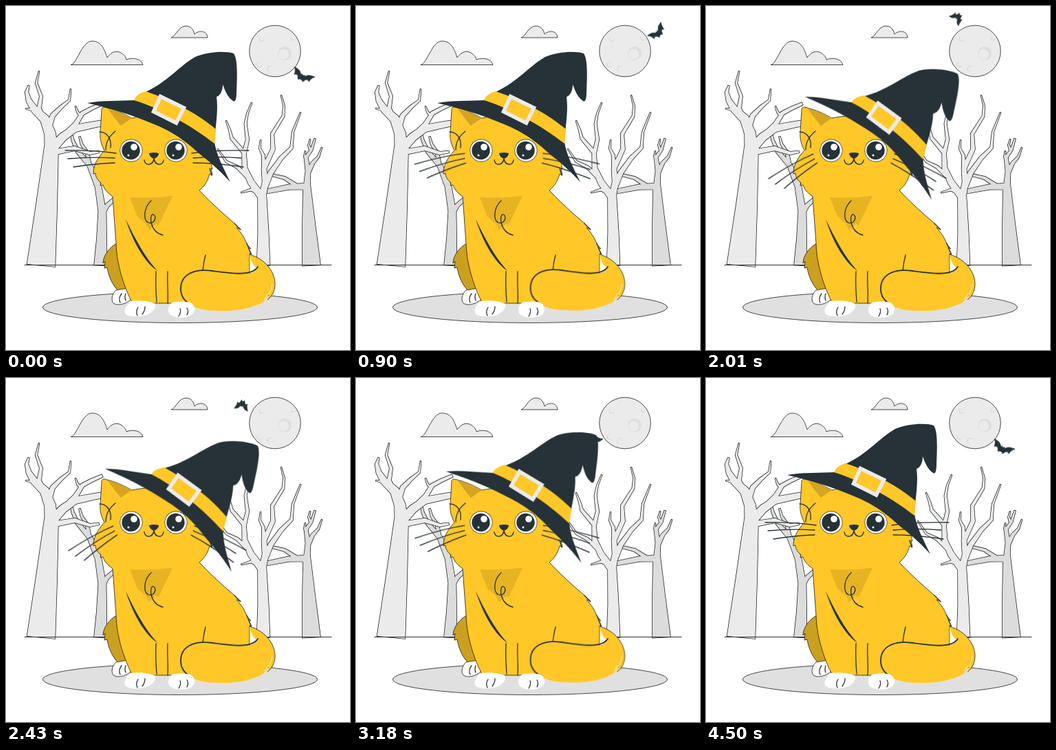
An HTML page for the animation above (4.56 s loop, 500 by 500 pixels).

```html
<!DOCTYPE html>
<html lang="en">
<head>
<meta charset="utf-8">
<title>Halloween cat</title>
<style>
html, body { margin: 0; width: 100%; height: 100%; overflow: hidden; background: #fff; }
svg { display: block; width: 100%; height: 100%; }
.edge { stroke: #1c1c1c; stroke-width: .8; }
.pale { fill: #ebebeb; }
.fur { fill: #ffc727; }
.ink { fill: #263238; }
.line { fill: none; stroke: #263238; stroke-width: 1.5; stroke-linecap: round; }
.anim { animation: 4560ms linear infinite; }
#orbit { transform-origin: 391px 65px; animation-name: orbit; }
#wings { animation-name: flap; }
#hat { transform-origin: 182px 280px; animation-name: tilt; }
#left { --turn: -32deg; transform-origin: 160px 222px; animation-name: droop; }
#right { --turn: 28deg; transform-origin: 270px 222px; animation-name: droop; }
#tail { transform-origin: 366px 380px; animation-name: sway; }
#wings, #hat, #left, #right, #tail { animation-timing-function: ease-in-out; }
@keyframes orbit {
  0% { transform: rotate(0deg); }
  98.68%, 100% { transform: rotate(-360deg); }
}
@keyframes flap {
  0%, 100% { transform: scaleX(1.02); }
  45% { transform: scaleX(.6); }
  94% { transform: scaleX(1.04); }
}
@keyframes tilt {
  0%, 20.8%, 81.6%, 100% { transform: rotate(0deg); }
  35.5%, 57.9% { transform: rotate(10.2deg); }
}
@keyframes droop {
  0%, 12.5%, 81.6%, 100% { transform: rotate(0deg); }
  27.4%, 59.2% { transform: rotate(var(--turn)); }
}
@keyframes sway {
  0%, 33%, 55%, 83%, 100% { transform: rotate(0deg); }
  20%, 69.7% { transform: rotate(.7deg); }
}
</style>
</head>
<body>
<svg viewBox="0 0 500 500">
  <g class="pale edge">
    <path d="M94 85.5C103 85 110 51 125 51C138 51 143 62 147 75C153 67 160 64 167 68C172 71 174 74 175 78C185 74 197 77 199 85.5Z"/>
    <path d="M240 46C247 44 250 30 261 29C270 29 273 36 274 41C280 35 292 35 293 46Z"/>
    <circle cx="391" cy="65.5" r="37.3"/>
  </g>
  <g fill="#dedede">
    <circle cx="405" cy="69" r="10"/><circle cx="371.500" cy="48" r="4"/>
    <circle cx="417" cy="47" r="3.500"/><circle cx="368" cy="85.500" r="4"/><circle cx="384" cy="91.500" r="5"/>
  </g>
  <g class="pale">
    <circle cx="403.500" cy="70" r="7.500"/><circle cx="372" cy="47" r="3"/>
    <circle cx="417.500" cy="46" r="2.500"/><circle cx="369" cy="85" r="3"/><circle cx="385" cy="92" r="4"/>
  </g>

  <g id="trees"></g>
  <path class="line" style="stroke-width:1" d="M27 376.500H473"/>
  <ellipse class="edge" cx="253" cy="438" rx="199.500" ry="22.500" fill="#e0e0e0"/>

  <g id="orbit" class="anim">
    <g transform="translate(432 100) rotate(27)">
      <path id="wings" class="ink anim" d="M-17 -5C-10 -5 -5 -3 -3 1L-2 -1L0 1L2 -1L3 1C5 -3 10 -5 17 -5C13 -1 12 2 12 6C9 3 6 4 5 8L3 10L2 8H-2L-3 10L-5 8C-6 4 -9 3 -12 6C-12 2 -13 -1 -17 -5Z"/>
    </g>
  </g>

  <!-- body -->
  <path class="edge" fill="#cca01f" d="M161 345C150 351 141 363 141 374L144 371L143 381L147 380C150 398 158 411 170 420L186 412Z"/>
  <path class="edge" fill="#fff" d="M160 413C153 419 152 431 158 433C165 436 178 432 184 424L178 410Z"/>
  <path class="fur edge" d="M139 151C139 147 142 146 147 148C160 151 173 157 183 163C192 161 201 160 208 160L290 180C299 205 297 226 300 237L298 236L300 246L296 244C293 256 287 263 281 268C292 280 304 291 316 302L331 315L341 325L335 322C342 330 347 337 350 346L356 353L352 351L357 361L354 360V388L350 432H184C174 414 161 380 160 345L155 277C148 272 143 267 141 260L137 261L138 257C133 253 130 248 130 243L127 244C127 231 133 221 143 210C139 202 136 194 137 184Z"/>
  <path fill="#d4a422" d="M148 149C162 152 173 157 183 163C177 167 172 170 167 174C159 164 153 157 148 149Z"/>
  <path fill="#e6b323" d="M180 278Q211 280 242 276L222 318L217 317L208 326L204 317L191 306Z"/>
  <g class="line" style="stroke-width:1.300">
    <path d="M136 183C146 183 154 192 152 206M159 182C150 189 145 199 145 209"/>
    <path d="M211 283C200 293 199 311 207 315C216 318 220 305 214 303C208 302 208 328 228 333"/>
    <path d="M218 386C217 402 218 417 219 430M235 386C234 401 236 417 235 432M286 385Q287 373 290 362"/>
    <path d="M332 316L341 325M350 345L356 360M296 236L299 246"/>
  </g>
  <path class="ink" d="M174 310C187 337 201 364 220 385C203 373 187 349 174 310Z"/>

  <g id="tail" class="anim">
    <path class="fur" d="M354 361C380 369 391 389 391 404C391 414 387 422 380 427L383 419L374 430C357 440 334 444 309 443C290 443 275 440 264 432C253 424 252 408 259 397C273 376 310 387 354 389Z"/>
    <path class="edge" fill="none" d="M354 361C380 369 391 389 391 404C391 414 387 422 380 427"/>
    <path fill="#fff" d="M355 364C357 374 361 380 366 380C362 385 359 387 355 388Z"/>
    <path class="line" style="stroke-width:1.800" d="M366 379C357 393 330 389 300 385C272 381 254 391 254 411C254 423 261 430 269 434"/>
    <path fill="none" stroke="#fff3c8" d="M387 404Q386 413 382 419M381 417L376 426"/>
  </g>

  <path fill="#fff" d="M182 429C174 434 170 443 174 448C181 453 198 452 207 448C215 444 219 437 216 432C206 429 194 427 182 429Z"/>
  <path fill="#fff" d="M241 431C234 437 234 447 241 450C250 455 267 453 272 447C277 440 272 433 268 431C260 429 250 429 241 431Z"/>
  <path class="line" style="stroke-width:1.300" d="M168 418C165 422 164 427 166 431M174 418Q172 423 174 428M192 438Q188 444 191 450M202 437Q202 443 198 448M253 440Q255 445 251 451M263 439Q266 444 263 449"/>

  <!-- face -->
  <g id="eyes"></g>
  <path class="ink" d="M208 214Q215 212 222 214C222 218 218 221 215 222C212 221 208 218 208 214Z"/>
  <path class="line" d="M201 224C202 232 213 233 215 222C217 233 228 232 229 224"/>
  <g class="line" style="stroke-width:1.300">
    <path id="left" class="anim" d="M160 214Q125 209 86 210M158 221Q124 219 90 222M158 228Q130 229 98 234"/>
    <path id="right" class="anim" d="M270 214Q305 209 353 210M272 221Q306 218 342 221M272 228Q302 228 345 234"/>
  </g>

  <g id="hat" class="anim">
    <path class="ink" d="M118 141C140 137 165 138 187 137L203 125C235 110 251 88 275 74C294 66 320 65 331 69C337 77 336 102 335 126C335 136 333 140 330 138C322 133 318 122 315 114C315 122 312 130 306 132C309 152 304 177 303 197C305 215 316 235 326 256C315 244 300 229 285 218C270 205 255 190 225 176C198 164 163 151 118 141Z"/>
    <path class="fur" d="M186 137C189 130 195 126 203 124C245 138 280 158 305 179L303 200C270 174 223 148 186 137Z"/>
    <path class="fur" stroke="#ebebeb" stroke-width="5.500" d="M224.500 131.500L258.500 148L247.500 170L214.500 153.500Z"/>
  </g>
</svg>
<script>
const SVG = "http://www.w3.org/2000/svg";
const add = (parent, tag, attrs) => {
  const el = document.createElementNS(SVG, tag);
  for (const k in attrs) el.setAttribute(k, attrs[k]);
  return parent.appendChild(el);
};

// Tapered limb along a polyline, from width a to width b
function limb(a, b, line) {
  const pts = line.split(" ").map(p => p.split(",").map(Number));
  const n = pts.length - 1, near = [], far = [];
  pts.forEach(([x, y], i) => {
    const p = pts[Math.max(i - 1, 0)], q = pts[Math.min(i + 1, n)];
    const dx = q[0] - p[0], dy = q[1] - p[1];
    const h = (a + (b - a) * i / n) / 2 / Math.hypot(dx, dy);
    near.push([x - dy * h, y + dx * h]);
    far.unshift([x + dy * h, y - dx * h]);
  });
  return "M" + [...near, ...far].map(p => p.map(v => v.toFixed(1)).join(" ")).join("L") + "Z";
}

function tree(fill, ...limbs) {
  const d = limbs.map(l => limb(...l)).join("");
  const g = document.getElementById("trees");
  add(g, "path", { d, fill: "none", stroke: "#1c1c1c", "stroke-width": 1.5 });
  add(g, "path", { d, fill });
}

tree("#dcdcdc",
  [18, 11, "137,377 139,340 140,295"],
  [11, 2, "140,300 134,262 122,232 104,211 97,195 94,181"],
  [6, 2, "121,232 118,213 110,201 107,190"],
  [7, 5, "140,302 147,290 158,280"]);
tree("#ebebeb",
  [41, 20, "51,377 59,290 66,205"],
  [19, 2, "66,212 64,185 56,164 41,150 33,137 30,125 33,116"],
  [8, 1, "54,163 48,149 51,131 44,112 48,95"],
  [9, 1, "62,176 68,159 80,147 92,137 94,121"],
  [5, 1, "46,155 38,151 29,149"],
  [14, 7, "68,206 83,190 100,178 130,172 165,166"],
  [8, 4, "88,185 101,172 111,156 124,149 140,142"],
  [4, 1, "109,160 104,154 101,146"],
  [8, 3, "72,212 100,207 122,214 135,212"]);
tree("#dcdcdc",
  [26, 10, "444,377 440,315 437,258"],
  [9, 2, "437,264 439,240 436,220 444,209 449,193"],
  [7, 1, "439,242 446,228 454,219 459,206"],
  [4, 1, "437,228 434,219 435,211"],
  [4, 1, "443,211 440,202 442,194"],
  [9, 6, "437,262 412,263 376,270"],
  [6, 3, "425,263 405,250 384,245"]);
tree("#ebebeb",
  [19, 12, "374,377 374,330 372,270"],
  [11, 1, "372,278 356,256 347,236 346,213 328,192 325,180 320,167"],
  [6, 1, "346,215 351,194 348,171 351,156 357,141"],
  [6, 1, "352,249 336,234 320,226 308,208"],
  [6, 1, "370,272 356,267 342,271"],
  [10, 1, "373,276 377,256 375,236 388,208 387,186 403,160 404,145 400,130"],
  [6, 1, "375,238 374,217 369,207 370,195"],
  [9, 1, "374,268 385,242 400,221 415,206 417,183 428,155"]);

const eyes = document.getElementById("eyes");
for (const x of [182, 247]) {
  const dot = (dx, y, r, fill) => add(eyes, "circle", { cx: x + dx, cy: y, r, fill });
  dot(0, 210, 16.5, "#263238");
  dot(0, 210, 15.8, "#fff");
  dot(-.5, 210, 13.2, "#263238");
  dot(4, 205, 4.8, "#fff");
  dot(-4, 217, 1.5, "#fff");
}
</script>
</body>
</html>
```
